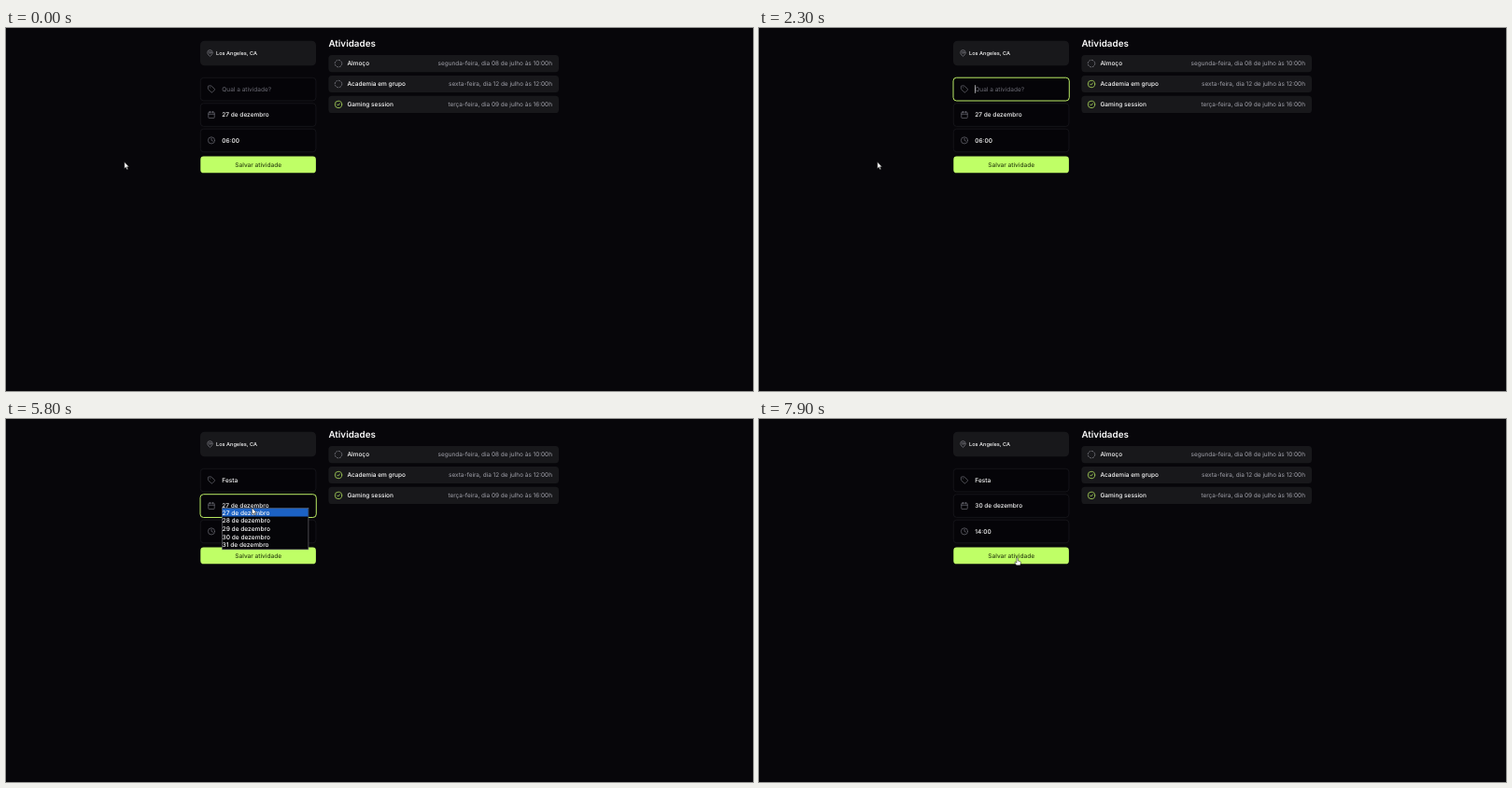
These frames come from a looping animation (800 by 389 pixels, 8000 ms). An HTML page:

```html
<!DOCTYPE html>
<html lang="pt-BR">
<head>
<meta charset="utf-8">
<title>Atividades</title>
<style>
  html, body { margin: 0; width: 100%; height: 100%; overflow: hidden; background: #07060a; }
  svg { display: block; width: 100%; height: 100%; }
  text { font-family: Inter, sans-serif; font-size: 6.52px; fill: #fafafa; white-space: pre; text-rendering: geometricPrecision; }
  .medium { font-weight: 500; }
  .icon { fill: none; stroke-width: 1.9; stroke-linecap: round; stroke-linejoin: round; }
</style>
</head>
<body>
<svg id="stage" viewBox="0 0 800 389"></svg>
<script>
const LOOP = 8000, LIME = '#bef264', PITCH = 8.72;
const stage = document.getElementById('stage');

function add(tag, attrs, parent = stage, content) {
  const el = document.createElementNS('http://www.w3.org/2000/svg', tag);
  for (const k in attrs) el.setAttribute(k, attrs[k]);
  if (content !== undefined) el.textContent = content;
  parent.appendChild(el);
  return el;
}
const rect = (x, y, width, height, attrs, parent) => add('rect', { x, y, width, height, ...attrs }, parent);
const label = (x, y, str, attrs, parent) => add('text', { x, y, ...attrs }, parent, str);
const show = (el, on) => el.setAttribute('visibility', on ? 'visible' : 'hidden');

// Icons are drawn on a 24-unit grid and centred on (cx, cy).
function icon(cx, cy, size, stroke, d, attrs) {
  const s = size / 24;
  return add('path', { class: 'icon', d, stroke, transform: `translate(${cx - size / 2} ${cy - size / 2}) scale(${s})`, ...attrs });
}
const CIRCLE = 'M22 12a10 10 0 1 1-20 0a10 10 0 1 1 20 0';
const ICONS = {
  pin: 'M20 10c0 6-8 12-8 12s-8-6-8-12a8 8 0 0 1 16 0M15 10a3 3 0 1 1-6 0a3 3 0 1 1 6 0',
  tag: 'M12.6 2.6A2 2 0 0 0 11.2 2H4a2 2 0 0 0-2 2v7.2a2 2 0 0 0 .6 1.4l8.7 8.7a2.4 2.4 0 0 0 3.4 0l6.6-6.6a2.4 2.4 0 0 0 0-3.4zM7.5 7.5h.1',
  calendar: 'M8 2v4M16 2v4M5 4h14a2 2 0 0 1 2 2v14a2 2 0 0 1-2 2H5a2 2 0 0 1-2-2V6a2 2 0 0 1 2-2M3 10h18',
  clock: CIRCLE + 'M12 6v6l4 2',
  done: CIRCLE + 'M8 12l3 3l5-6'
};

const rings = {};
function ring(name, x, y, w, h, r) {
  rings[name] = rect(x, y, w, h, { rx: r, fill: 'none', stroke: LIME, 'stroke-width': 0.95 });
}

// Location
rect(208, 13.7, 124, 26.6, { rx: 4.5, fill: '#18181b' });
icon(218.5, 27, 8.2, '#8b8b93', ICONS.pin);
label(225, 29.1, 'Los Angeles, CA', { class: 'medium', style: 'font-size:5.6px' });

// Form
function field(name, y, glyph) {
  rect(208.3, y, 123.6, 24.6, { rx: 3.4, fill: '#050408', stroke: '#1f1f24', 'stroke-width': 0.6 });
  icon(220, y + 12.2, 8.6, '#71717a', ICONS[glyph]);
  ring(name, 208, y - 0.1, 124.3, 24.8, 3.6);
  return label(231.3, y + 14.5, '', { class: 'medium' });
}
const title = field('title', 53.3, 'tag');
const date = field('date', 80.8, 'calendar');
const time = field('time', 108.2, 'clock');
const hint = label(231.3, 67.8, 'Qual a atividade?', { style: 'fill:#6c6c75' });
const caret = rect(231.4, 61.2, 0.6, 8.6, { fill: '#fff' });

rect(208.3, 137.6, 123.6, 17.7, { rx: 3.4, fill: '#bfff66' });
label(270.2, 148.8, 'Salvar atividade', { class: 'medium', 'text-anchor': 'middle', style: 'fill:#2c4210' });
ring('save', 207.6, 136.8, 125, 19.4, 4);

// Activities
label(345.4, 20.1, 'Atividades', { style: 'font-size:9.85px;font-weight:600' });
function activity(name, y, text, when, done) {
  rect(345.4, y - 9.1, 246.6, 18.2, { rx: 3.6, fill: '#18181b' });
  const open = icon(356, y, 9, '#8b8b93', CIRCLE, { 'stroke-dasharray': '3.6 4.25' });
  const check = icon(356, y, 9, LIME, ICONS.done);
  label(365.4, y + 2.3, text, { class: 'medium' });
  label(585, y + 2.3, when, { 'text-anchor': 'end', style: 'font-size:6.45px;fill:#a1a1aa' });
  ring(name, 345.4, y - 9.1, 246.6, 18.2, 3.8);
  const mark = on => { show(open, !on); show(check, on); };
  mark(done);
  return mark;
}
activity('lunch', 38.1, 'Almoço', 'segunda-feira, dia 08 de julho às 10:00h', false);
const markGym = activity('gym', 60, 'Academia em grupo', 'sexta-feira, dia 12 de julho às 12:00h', false);
activity('game', 81.9, 'Gaming session', 'terça-feira, dia 09 de julho às 16:00h', true);

// Native-looking option lists
function popup(top, items, scrolls) {
  const g = add('g', {}), h = items.length * PITCH;
  rect(231.3, top - 0.3, 92.6, h + 0.8, { fill: '#050508', stroke: '#77777c', 'stroke-width': 0.6 }, g);
  const bar = rect(231.6, top, scrolls ? 85.4 : 92, PITCH, { fill: '#1c62c4' }, g);
  items.forEach((s, i) => label(231.6, top + i * PITCH + 6.75, s, { class: 'medium', style: 'font-size:6.6px' }, g));
  if (scrolls) {
    rect(317, top, 6.7, h, { fill: '#f1f1f1' }, g);
    rect(317.4, top + 7, 5.9, 94.5, { fill: '#c1c1c1' }, g);
    add('path', { d: `M318.8 ${top + 4.6}h3l-1.5-1.9zM318.8 ${top + h - 4.4}h3l-1.5 1.9z`, fill: '#505050' }, g);
  }
  return (on, y) => {
    show(g, on);
    const row = Math.max(0, Math.min(items.length - 1, Math.floor((y - top) / PITCH)));
    bar.setAttribute('y', top + row * PITCH);
  };
}
const days = [27, 28, 29, 30, 31].map(d => d + ' de dezembro');
const hours = Array.from({ length: 20 }, (_, i) => String(6 + (i >> 1)).padStart(2, '0') + (i % 2 ? ':30' : ':00'));
const dayList = popup(95.8, days, false);
const hourList = popup(123.7, hours, true);

// Pointer
const arrow = add('path', { d: 'M0 0V7L1.6 5.6L2.7 8.1L3.9 7.6L2.8 5.2H5Z', fill: '#fff', stroke: '#111', 'stroke-width': 0.5 });
const hand = add('path', {
  d: 'M-.7.2Q0-.6.7.2V3L3 3.5Q3.9 3.8 3.8 4.8L3.2 7.8H-.9L-2.8 5Q-2.9 4-1.9 4.2L-.7 5.1Z',
  fill: '#fff', stroke: '#111', 'stroke-width': 0.5
});
const path = [
  [2300, 126.8, 143.6], [2800, 267.2, 72.4], [5200, 267.2, 72.4], [5500, 263.4, 95.2], [5820, 263.4, 95.2],
  [6050, 266, 126], [6200, 266, 126], [6400, 265, 121], [6540, 265, 123], [6700, 267.8, 142.6],
  [6920, 268, 266], [7120, 268, 266], [7600, 276.6, 149]
];
const ease = u => u * u * (3 - 2 * u);
function pointer(t) {
  const i = path.findIndex(p => p[0] > t);
  if (i === 0) return path[0].slice(1);
  if (i < 0) return path[path.length - 1].slice(1);
  const [a, b] = [path[i - 1], path[i]];
  const k = ease((t - a[0]) / (b[0] - a[0]));
  return [a[1] + (b[1] - a[1]) * k, a[2] + (b[2] - a[2]) * k];
}

const focusAt = [
  [0, ''], [100, 'title'], [300, 'date'], [500, 'time'], [650, 'save'], [800, 'lunch'], [1000, 'gym'],
  [1600, 'game'], [2000, ''], [2300, 'title'], [5500, 'date'], [6400, 'time'], [7900, '']
];
const keysAt = [3800, 4000, 4100, 4200, 4400];

function render(t) {
  const focus = focusAt.filter(f => f[0] <= t).pop()[1];
  for (const name in rings) show(rings[name], name === focus);
  markGym(t >= 1300);

  const typed = 'Festa'.slice(0, keysAt.filter(k => k <= t).length);
  title.textContent = typed;
  show(hint, !typed);
  date.textContent = t < 6200 ? days[0] : days[3];
  time.textContent = t < 7100 ? hours[0] : hours[16];

  // The caret restarts its blink on focus and on each key.
  const since = t - [100, 2300, ...keysAt].filter(k => k <= t).pop();
  show(caret, focus === 'title' && since % 1100 < 580);
  caret.setAttribute('x', 231.4 + (typed ? title.getComputedTextLength() + 0.2 : 0));

  // The highlighted option trails the pointer slightly.
  const [x, y] = pointer(t), lagged = pointer(t - 60)[1];
  dayList(t >= 5600 && t < 6200, lagged);
  hourList(t >= 6500 && t < 7100, lagged);

  const onButton = t >= 7120 && y > 137.5 && y < 155.5;
  show(arrow, !onButton);
  show(hand, onButton);
  (onButton ? hand : arrow).setAttribute('transform', `translate(${x} ${y})`);
}

const start = performance.now();
function tick() {
  render((performance.now() - start) % LOOP);
  requestAnimationFrame(tick);
}
tick();
</script>
</body>
</html>
```
